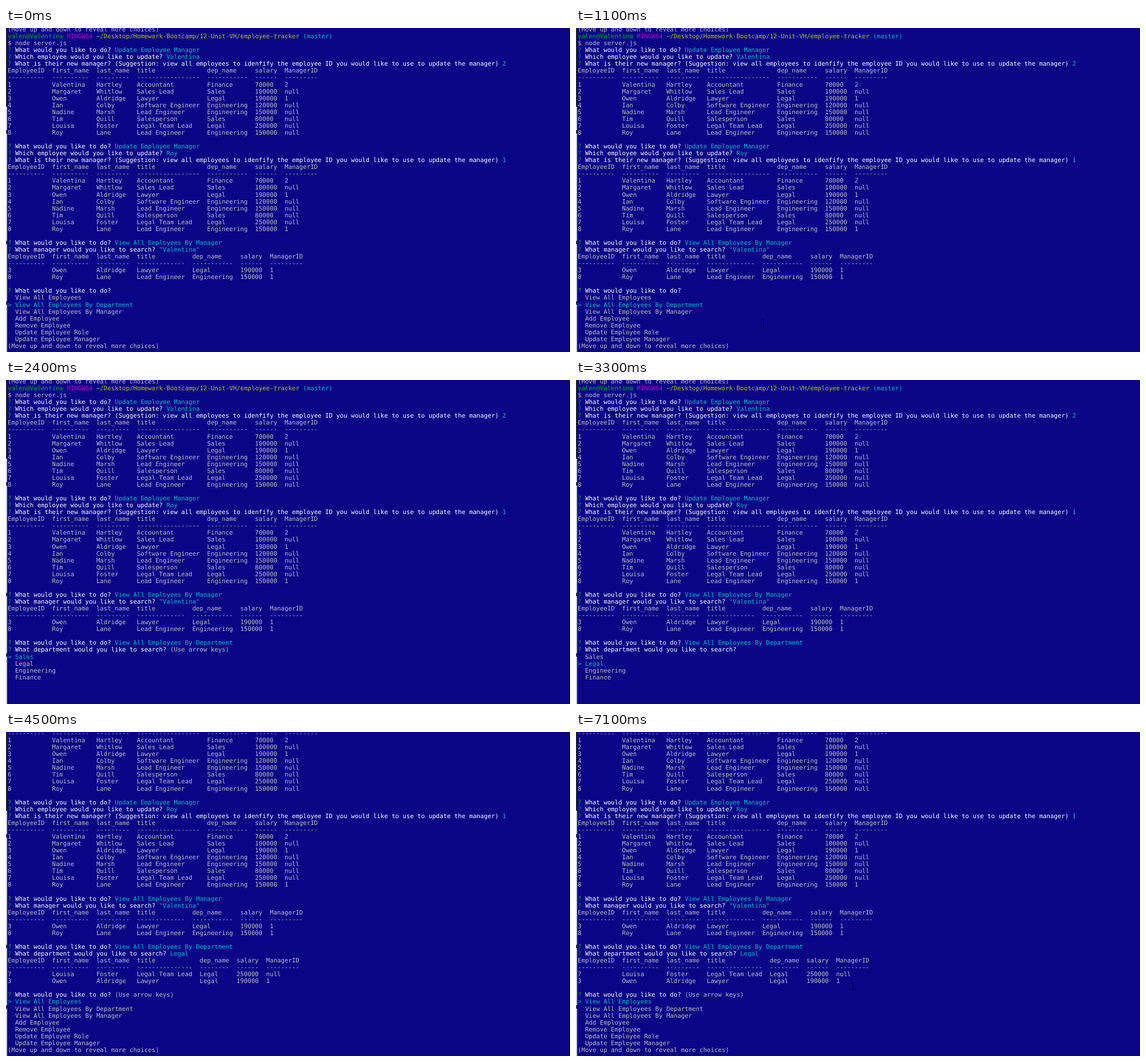
Recreate the animation shown at these times as an HTML page. Size 986x568 px, loop 7.2 s.

```html
<!DOCTYPE html>
<html lang="en">
<head>
<meta charset="utf-8">
<title>Employee tracker</title>
<style>
html, body { margin: 0; width: 100%; height: 100%; overflow: hidden; background: #0a0587; }
pre {
  position: absolute; left: 3px; top: -3px; margin: 0; color: #bfbfbf;
  font: 10.72px/12.0625px "DejaVu Sans Mono", monospace;
  text-rendering: geometricPrecision; font-variant-ligatures: none;
}
.w { color: #fff }
.g { color: #00b020 }
.c { color: #00bfc4 }
.m { color: #bf00bf }
.y { color: #bfbf20 }
#edge {
  position: absolute; left: 0; top: 0; width: 2px; height: 100%;
  background: linear-gradient(#202038 138px, #c4c8dc 138px 179px, #303050 179px 185px, #c4c8dc 185px 373px,
    #303050 373px 379px, #c4c8dc 379px 479px, #303050 479px 485px, #c4c8dc 485px);
}
#mouse { position: absolute; left: -4px; top: -7px; width: 8px; height: 14px; fill: none; stroke: #000; }
</style>
</head>
<body>
<pre id="screen"></pre>
<div id="edge"></div>
<svg id="mouse" viewBox="0 0 8 14"><path d="M1.5 .5h2l1 1 1-1h1M4.5 1.5v11M1.5 13.5h2l1-1 1 1h1"/></svg>
<script>
const output = document.getElementById('screen');
const mouse = document.getElementById('mouse');

const paint = (cls, text) => `<span class="${cls}">${text}</span>`;
const ask = (question, answer = '') => `${paint('g', '?')} ${paint('w', question)} ${answer}`;
const reply = (question, answer) => ask(question, paint('c', answer));

const header = ['EmployeeID', 'first_name', 'last_name', 'title', 'dep_name', 'salary', 'ManagerID'];
const staff = [
  ['1', 'Valentina', 'Hartley', 'Accountant', 'Finance', '70000', '2'],
  ['2', 'Margaret', 'Whitlow', 'Sales Lead', 'Sales', '100000', 'null'],
  ['3', 'Owen', 'Aldridge', 'Lawyer', 'Legal', '190000', '1'],
  ['4', 'Ian', 'Colby', 'Software Engineer', 'Engineering', '120000', 'null'],
  ['5', 'Nadine', 'Marsh', 'Lead Engineer', 'Engineering', '150000', 'null'],
  ['6', 'Tim', 'Quill', 'Salesperson', 'Sales', '80000', 'null'],
  ['7', 'Louisa', 'Foster', 'Legal Team Lead', 'Legal', '250000', 'null'],
  ['8', 'Roy', 'Lane', 'Lead Engineer', 'Engineering', '150000', 'null']
];
const roy = [...staff[7].slice(0, 6), '1'];

function table(rows) {
  const widths = header.map((h, i) => Math.max(h.length, ...rows.map(r => r[i].length)));
  const line = cells => cells.map((s, i) => s.padEnd(widths[i])).join('  ');
  return [line(header), line(widths.map(w => '-'.repeat(w))), ...rows.map(line), ''];
}

const list = (items, picked) =>
  items.map((s, i) => i === picked ? paint('c', '&gt; ' + s) : '  ' + s);

const todo = 'What would you like to do?';
const which = 'Which employee would you like to update?';
const boss = 'What is their new manager? (Suggestion: view all employees to idenfify ' +
  'the employee ID you would like to use to update the manager)';
const dept = 'What department would you like to search?';
const byDept = 'View All Employees By Department';
const hint = '(Use arrow keys)';
const more = '(Move up and down to reveal more choices)';
const actions = ['View All Employees', byDept, 'View All Employees By Manager', 'Add Employee',
  'Remove Employee', 'Update Employee Role', 'Update Employee Manager'];
const depts = ['Sales', 'Legal', 'Engineering', 'Finance'];

const past = [
  more,
  paint('g', 'valen@Valentina') + ' ' + paint('m', 'MINGW64') + ' ' +
    paint('y', '~/Desktop/Homework-Bootcamp/12-Unit-VH/employee-tracker') + ' ' + paint('c', '(master)'),
  '$ node server.js',
  reply(todo, actions[6]), reply(which, 'Valentina'), reply(boss, '2'),
  ...table(staff),
  reply(todo, actions[6]), reply(which, 'Roy'), reply(boss, '1'),
  ...table([...staff.slice(0, 7), roy]),
  reply(todo, actions[2]), reply('What manager would you like to search?', '"Valentina"'),
  ...table([staff[2], roy])
];

const chosen = [...past, reply(todo, byDept)];
const stages = [
  [0, [...past, ask(todo), ...list(actions, 1), more]],
  [1500, [...chosen, ask(dept, hint), ...list(depts, 0)]],
  [2700, [...chosen, ask(dept), ...list(depts, 1)]],
  [3600, [...chosen, reply(dept, 'Legal'), ...table([staff[6], staff[2]]),
    ask(todo, hint), ...list(actions, 0), more]]
];

// Pointer path: time, x, y; hidden while keys are pressed
const visits = [
  [[300, 318, 580], [600, 327, 517], [1300, 327, 517]],
  [[4800, 327, 517], [5500, 484, 446], [7200, 484, 446]]
];

function pointer(t) {
  for (const path of visits)
    for (let i = 1; i < path.length; i++) {
      const [a, x, y] = path[i - 1], [b, u, v] = path[i];
      if (t < a || t >= b) continue;
      const p = (t - a) / (b - a), k = p * p * (3 - 2 * p);
      return [x + (u - x) * k, y + (v - y) * k].map(Math.round);
    }
}

const visibleRows = 47;
let shown;
function draw(now) {
  const t = now % 7200;
  const lines = stages.filter(s => t >= s[0]).pop()[1];
  if (lines !== shown) {
    shown = lines;
    output.innerHTML = lines.slice(-visibleRows).join('\n');
  }
  const at = pointer(Math.floor(t / 100) * 100);
  mouse.style.display = at ? '' : 'none';
  if (at) mouse.style.transform = `translate(${at[0]}px, ${at[1]}px)`;
  requestAnimationFrame(draw);
}
draw(performance.now());
</script>
</body>
</html>
```
